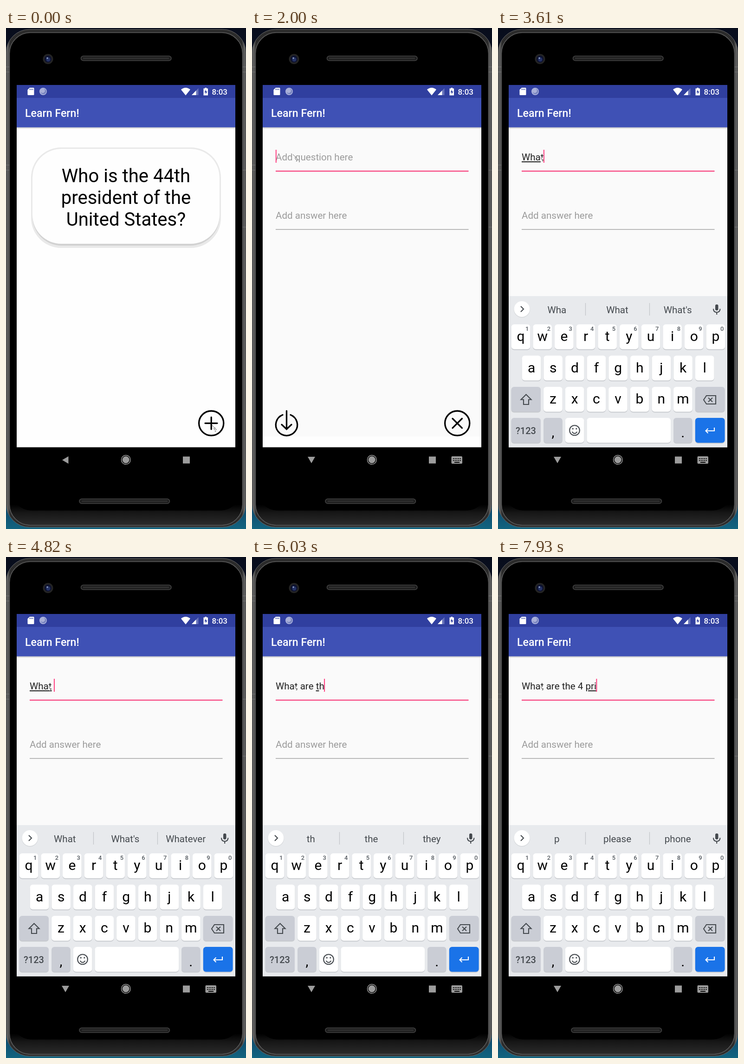
These frames come from a looping animation (517x1082 px, 8 s). An HTML page:

```html
<!DOCTYPE html>
<html lang="en">
<head>
<meta charset="utf-8">
<title>Study cards</title>
<style>
html, body { margin: 0; width: 100%; height: 100%; overflow: hidden; background: #000; }
svg { display: block; width: 100%; height: 100%; font-family: Roboto, sans-serif; }
.mid { text-anchor: middle; }
.med { font-weight: 500; }
.line { fill: none; stroke: #000; stroke-width: 3.3; stroke-linecap: round; }
.icon { fill: none; stroke: #44494e; stroke-width: 2.1; }
.field { font-size: 20.6px; white-space: pre; }
.u { text-decoration: underline 1.2px; text-underline-offset: .8px; text-decoration-skip-ink: none; }
#keys text { font-size: 30px; text-anchor: middle; }
#keys .num { font-size: 13px; font-weight: 500; fill: #555b61; }
#words text { font-size: 20.6px; fill: #44494e; text-anchor: middle; }
</style>
</head>
<body>
<svg viewBox="0 0 517 1082" preserveAspectRatio="none">
  <defs>
    <linearGradient id="desk" x2="0" y2="1">
      <stop stop-color="#080d1c"/><stop offset=".5" stop-color="#16243a"/>
      <stop offset=".95" stop-color="#0f4468"/><stop offset="1" stop-color="#126480"/>
    </linearGradient>
    <linearGradient id="rim">
      <stop stop-color="#3a3a3a"/><stop offset=".006" stop-color="#666"/><stop offset=".016" stop-color="#2b2b2b"/>
      <stop offset=".984" stop-color="#2b2b2b"/><stop offset=".994" stop-color="#666"/><stop offset="1" stop-color="#3a3a3a"/>
    </linearGradient>
    <linearGradient id="chin" x2="0" y2="1">
      <stop offset=".958" stop-color="#000"/><stop offset=".975" stop-color="#171717"/><stop offset="1" stop-color="#2b2b2b"/>
    </linearGradient>
    <linearGradient id="drop" x2="0" y2="1">
      <stop stop-color="#000" stop-opacity=".25"/><stop offset="1" stop-color="#000" stop-opacity="0"/>
    </linearGradient>
  </defs>

  <!-- phone -->
  <rect width="517" height="1082" fill="url(#desk)"/>
  <rect x=".5" y="3" width="516" height="1075" rx="50" fill="url(#rim)" stroke="#6a6a6a"/>
  <rect x="7.5" y="10" width="502" height="1064" rx="45" fill="url(#chin)" stroke="#5c5c5c" stroke-width="1.5"/>
  <rect x="14" y="18" width="489" height="1024" rx="40"/>
  <path d="M0 84h7M0 95h7M0 296h7M0 307h7M510 84h7M510 95h7M510 307h7M510 430h7" stroke="#777"/>
  <g fill="#1d1d1d" stroke="#464646" stroke-width="1.5">
    <rect x="161.5" y="60.5" width="194.500" height="10" rx="5"/>
    <rect x="158" y="1017" width="194.500" height="10" rx="5"/>
  </g>
  <path d="M166 65.500h185M163 1022h185" stroke="#303030" stroke-width="3"/>
  <circle cx="90.500" cy="67" r="11" fill="#242424"/>
  <circle cx="90.500" cy="67" r="7.500" fill="#0d1230"/>
  <circle cx="91" cy="68" r="4.500" fill="#253366"/>
  <circle cx="89" cy="65" r="1.700" fill="#93a6cf"/>

  <!-- first screen -->
  <rect x="23" y="123" width="471" height="782.500" fill="#fefefe"/>
  <g id="home">
    <rect x="54" y="258" width="409" height="217" rx="65" fill="#e9e9e9"/>
    <rect x="57" y="261" width="403" height="209" rx="63" fill="#d2d2d2"/>
    <rect x="57" y="261" width="403" height="205" rx="62" fill="#fefefe"/>
    <g class="mid" font-size="40.1">
      <text x="258.500" y="333">Who is the 44th</text>
      <text x="258.500" y="380">president of the</text>
      <text x="258.500" y="427">United States?</text>
    </g>
    <path class="line" d="M429 853.600h26M442.200 840.600v26"/>
  </g>

  <!-- entry screen -->
  <g id="form">
    <rect x="23" y="214" width="471" height="668" fill="#fafafa"/>
    <text class="field" id="hint" x="51" y="286" fill="#9b9b9b">Add question here</text>
    <text class="field" id="typed" x="51" y="286" fill="#212121"><tspan></tspan><tspan class="u"></tspan><tspan></tspan></text>
    <rect id="caret" y="263" width="2" height="28" fill="#ff4081"/>
    <rect x="51" y="308" width="415.500" height="2.200" fill="#f7407c"/>
    <text class="field" x="51" y="412" fill="#9b9b9b">Add answer here</text>
    <rect x="51" y="434.500" width="415.500" height="1.100" fill="#858585"/>
    <path class="line" d="M432 843.500l20.400 20.400M452.400 843.500l-20.400 20.400"/>
    <path class="line" stroke-width="3" d="M66 835.500a23.200 23.200 0 1 0 17 0M74.500 827v39M64 856.500l10.500 10l10.500-10"/>
  </g>
  <circle class="line" cx="442.200" cy="853.600" r="26.600"/>

  <!-- bars -->
  <rect x="23" y="214.500" width="471" height="3.500" fill="url(#drop)"/>
  <rect x="23" y="123" width="471" height="29" fill="#303f9f"/>
  <rect x="23" y="151" width="471" height="63.500" fill="#3f51b5"/>
  <text class="med" x="41" y="192" font-size="23.200" fill="#fff">Learn Fern!</text>
  <g fill="#fff">
    <path d="M51 129h8q1.500 0 1.500 1.500v13q0 1.500-1.500 1.500h-11q-1.500 0-1.500-1.500v-10z"/>
    <path d="M51.500 131v3M54.500 131v3M57.500 131v3" stroke="#303f9f" stroke-width="1.300"/>
    <circle cx="80" cy="137" r="8" fill="#aab1dc"/>
    <circle cx="80.500" cy="137" r="6" fill="#7480bd"/>
    <circle cx="79" cy="135.500" r="5" fill="#a9b0d8"/>
    <path d="M377 133q10-8 20 0l-10 12.500z"/>
    <path d="M400 145l14.500-15v15z" fill="#6874ba"/>
    <path d="M400 145l9.500-10v10z"/>
    <path d="M428.500 129h3.500v1.500h3v15h-9.500v-15h3z"/>
    <path d="M431 133l-3.500 6h2.500v4l3.500-6h-2.500z" fill="#303f9f"/>
    <text class="med" x="443.500" y="143.500" font-size="17">8:03</text>
  </g>

  <!-- navigation -->
  <g fill="#9c9c9c">
    <path id="back"/>
    <circle cx="258.300" cy="932.500" r="7.500"/>
    <circle cx="258.300" cy="932.500" r="9.800" fill="none" stroke="#9c9c9c" stroke-width="1.500"/>
    <rect x="381" y="925.500" width="15" height="15"/>
    <g id="kbIcon">
      <rect x="429.500" y="925" width="23.500" height="16" rx="2"/>
      <path d="M433 930h17M433 934h17" stroke="#000" stroke-width="2" stroke-dasharray="2 1.700"/>
      <path d="M436 938h11" stroke="#000" stroke-width="2"/>
    </g>
  </g>

  <!-- keyboard -->
  <g id="board">
    <rect x="23" y="579" width="471" height="326.500" fill="#e8eaed"/>
    <circle cx="51.500" cy="608" r="17.500" fill="#d4d7da"/>
    <circle cx="51.500" cy="607" r="17" fill="#fff"/>
    <path id="chevron" class="icon"/>
    <g id="tools" class="icon">
      <circle cx="112.500" cy="605" r="6"/><path d="M117 609.500l7 7" stroke-width="2.700"/>
      <path d="M175 599h14q2 0 2 2v9l-6 6h-10q-2 0-2-2v-13q0-2 2-2zM191 610h-6v6M177.500 608q4 5 8 0M178 604h2M184 604h2"/>
      <text class="mid" x="250" y="613" font-size="15.500" font-weight="900" fill="#44494e" stroke="none" letter-spacing=".5">GIF</text>
      <path d="M311 600h16v16.500h-16zM314.500 607h9M314.500 610h9M314.500 613h6"/>
      <path d="M315 598h8v4h-8z" fill="#44494e"/>
      <path d="M360.500 595v25" stroke="#c3c6ca" stroke-width="1.200"/>
      <path d="M394.500 608h16" stroke-width="4.500" stroke-linecap="round" stroke-dasharray="0 7.500"/>
    </g>
    <g id="words">
      <path d="M188.500 594v27M326.500 594v27" stroke="#c0c3c7" stroke-width="1.200"/>
      <text x="126.800" y="615.500"></text><text x="257" y="615.500"></text><text x="387.200" y="615.500"></text>
    </g>
    <g class="icon">
      <rect x="468" y="597" width="6.500" height="13" rx="3.200" fill="#44494e" stroke="none"/>
      <path d="M464 606.500q0 7.500 7.200 7.500t7.200-7.500M471.200 614v5"/>
    </g>
    <g id="keys"></g>
    <g class="icon">
      <path d="M60.500 791.500l11 11h-5.500v10.500h-11v-10.500h-5.500z"/>
      <path d="M449 794h20v18h-20l-6-9zM453 798.500l9 9M462 798.500l-9 9"/>
      <circle cx="165" cy="869" r="10.800"/><path d="M159.500 872q5.500 7.500 11 0"/>
      <path d="M161.200 865.500h.1M168.800 865.500h.1" stroke-width="3.200" stroke-linecap="round"/>
      <path d="M466 863v7h-18M452.500 865l-5 5l5 5" stroke="#fff"/>
    </g>
  </g>

  <g id="mouse" fill="none" stroke="#555" stroke-width=".9">
    <path d="M3 3l8 8h-4l2 4l-3 1l-2-4z" fill="#fafafa" stroke="none"/>
    <path id="edge" d="M0 0l11 11"/>
    <path d="M3.500 8l4-1.500l-2.500 4l4 .5l-2 4l3-1" stroke-dasharray="2 1"/>
  </g>
</svg>
<script>
const $ = id => document.getElementById(id);
const LOOP = 8000;

// keyboard
const key = (x, y, w, label = "", fill = "#fff", num = "", base = 36) => `
  <rect x="${x}" y="${y + 1.500}" width="${w}" height="54" rx="6" fill="#c6c9cd"/>
  <rect x="${x}" y="${y}" width="${w}" height="53.800" rx="6" fill="${fill}"/>
  <text x="${x + w / 2}" y="${y + base}">${label}</text>
  <text class="num" x="${x + 34}" y="${y + 13.500}">${num}</text>`;
const row = (letters, x, y, nums = "") =>
  [...letters].map((c, i) => key(x + i * 46.650, y, 40.500, c, "#fff", nums[i])).join("");
const grey = "#cacdd5";
$("keys").innerHTML =
  row("qwertyuiop", 28.800, 640, "1234567890") +
  row("asdfghjkl", 51.800, 707.500) +
  key(28.500, 775, 63.500, "", grey) + row("zxcvbnm", 98.200, 775) + key(424.800, 775, 63.800, "", grey) +
  key(28.500, 842, 63.500, "", grey) + key(98.200, 842, 40.500, ",", grey, "", 41) + key(144.800, 842, 40.500) +
  key(191.500, 842, 180.500) + key(378, 842, 40.500, ".", grey, "", 42) + key(424.800, 842, 63.800, "", "#1a73e8") +
  `<text x="60" y="877" style="font-size:20px;font-weight:500" fill="#44494e">?123</text>`;

// [time, text with the composing part in brackets, caret shown]
const typing = [
  [0, "", 1], [1720, "", 0], [2000, "", 1], [2240, "", 0],
  [2510, "W", 1], [2660, "[W]", 1], [2940, "[W]h", 1], [3220, "[Wh]a", 1], [3610, "[Wha]t", 1], [3860, "[What]", 1],
  [4420, "[What]", 0], [4820, "[What] ", 1], [5090, "What ", 1], [5210, "What ar", 1],
  [5490, "What [ar]e", 1], [5640, "What [are]", 1], [5770, "What are ", 1],
  [5910, "What are t", 1], [6030, "What are [t]h", 1], [6150, "What are [the] ", 1], [6420, "What are the ", 1],
  [6920, "What are the 4", 1], [7190, "What are the 4 ", 1], [7310, "What are the 4 p", 1],
  [7560, "What are the 4 [p]", 1], [7930, "What are the 4 [pri]", 1]
];
// an empty entry shows the toolbar
const hints = [
  [0, ""], [2660, "W|What|Where"], [3360, "Wh|What|Where"], [3610, "Wha|What|What's"],
  [4010, "What|What's|Whatever"], [5090, "is|are|do"], [5490, "a|are|about"],
  [5640, "are|are the|area"], [5770, "the|you|your"], [5910, "t|the|to"],
  [6030, "th|the|they"], [6150, "they|the|their"], [6420, "dimensions|dates|plans"],
  [7070, ""], [7310, "types|main|most"], [7560, "p|please|phone"]
];
const fade = [[0, 0], [830, .2], [950, .6], [1070, .9], [1190, 1]];
const path = [[0, 443, 857], [430, 300, 560], [550, 130, 217], [830, 108, 277], [1350, 97, 275], [1470, 88, 273]];

const at = (steps, t) => steps.findLast(s => s[0] <= t);
const show = (id, on) => $(id).style.display = on ? "" : "none";
const spans = $("typed").children;
const slots = $("words").querySelectorAll("text");

function draw(t) {
  const alpha = at(fade, t)[1];
  $("form").style.opacity = alpha;
  $("home").style.opacity = 1 - alpha;

  const [, text, caret] = at(typing, t);
  const parts = text.split(/[\[\]]/);
  for (let i = 0; i < 3; i++) spans[i].textContent = parts[i] || "";
  show("hint", !text);
  show("caret", caret);
  $("caret").setAttribute("x", 50.800 + (text ? $("typed").getComputedTextLength() - .5 : 0));

  const words = at(hints, t)[1];
  show("tools", !words);
  show("words", words);
  words.split("|").forEach((w, i) => slots[i].textContent = w);
  $("chevron").setAttribute("d", words ? "M49 601l6 6l-6 6" : "M54.500 601l-6 6l6 6");

  show("board", t >= 2120);
  show("kbIcon", t >= 2000);
  $("back").setAttribute("d", t >= 2000 ? "M120 926h16l-8 14z" : "M121 933l13.500-8v16z");

  const [, x, y] = at(path, t);
  $("mouse").setAttribute("transform", `translate(${x} ${y})`);
  show("edge", t < 2510);
}

const start = performance.now();
function tick() {
  draw((performance.now() - start) % LOOP);
  requestAnimationFrame(tick);
}
tick();
</script>
</body>
</html>
```
